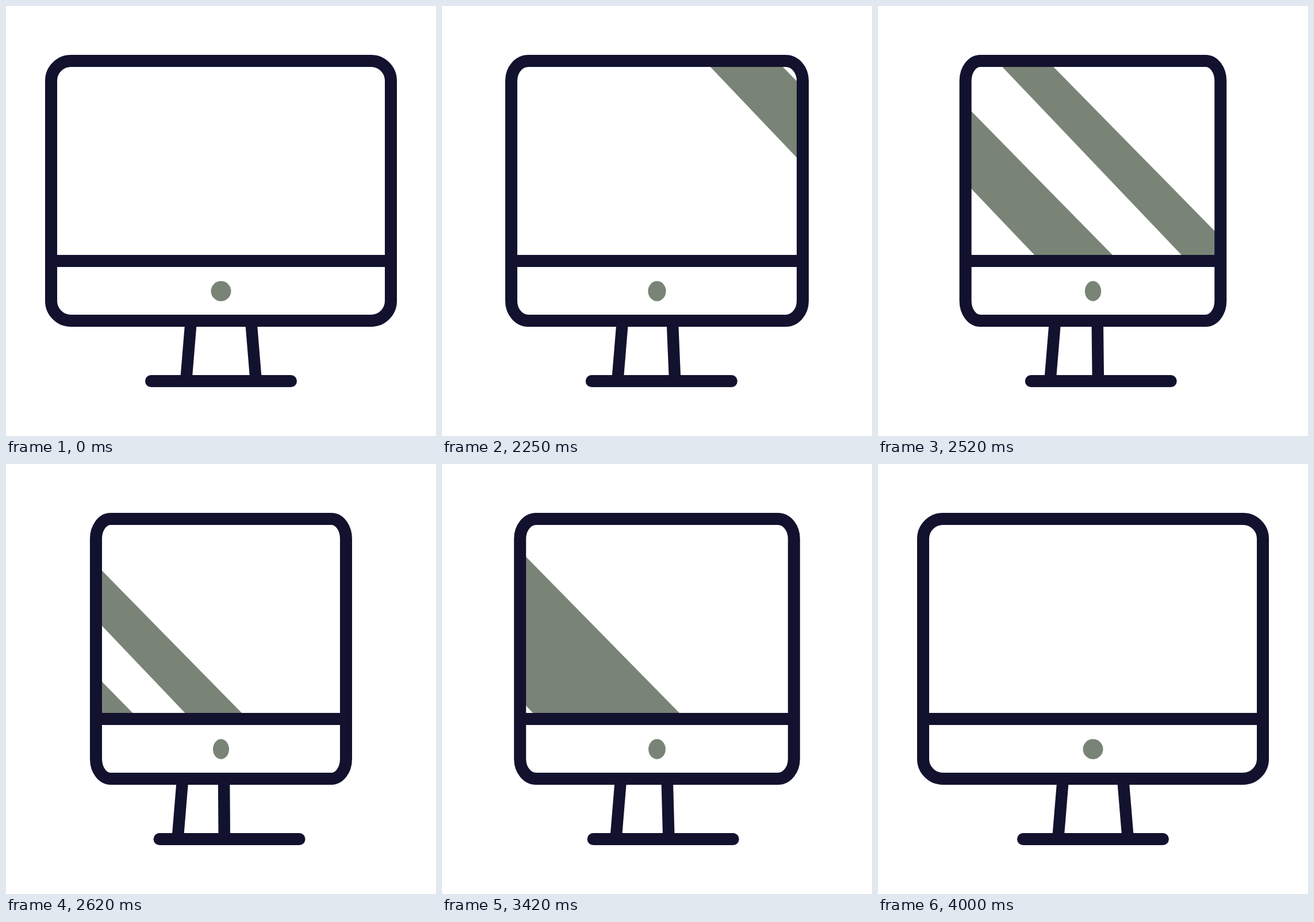
These frames come from a looping animation (748 by 748 pixels, 4.02 s). An HTML page:

```html
<!DOCTYPE html>
<html lang="en">
<head>
<meta charset="utf-8">
<title>Monitor</title>
<style>
  html, body { margin: 0; width: 100%; height: 100%; overflow: hidden; background: #fff; }
  svg { display: block; width: 100%; height: 100%; }
  .ink { fill: none; stroke: #12122f; stroke-width: 21; }
  .tint { fill: #798477; }
</style>
</head>
<body>
<svg viewBox="0 0 748 748">
  <clipPath id="screen"><rect class="case" y="95.5" height="452" ry="34.5"/></clipPath>
  <g class="tint" clip-path="url(#screen)">
    <polygon id="wide"/>
    <polygon id="thin"/>
    <polygon id="back"/>
  </g>
  <ellipse id="button" class="tint" cx="374" cy="496" ry="17.5"/>
  <g class="ink">
    <path id="legs" stroke-width="20.5"/>
    <path id="base" stroke-linecap="round"/>
    <path id="divider"/>
    <rect class="case" y="95.5" height="452" ry="34.5"/>
  </g>
</svg>
<script>
const LOOP = 4020, HALF = 295.5, TURN = 83.5;
const $ = id => document.getElementById(id);
const cases = document.querySelectorAll('.case');

// Bezier easing with control points (a, 0) and (b, 1)
function ease(x, a, b) {
  if (x <= 0) return 0;
  if (x >= 1) return 1;
  let lo = 0, hi = 1, u;
  for (let i = 0; i < 24; i++) {
    u = (lo + hi) / 2;
    const v = 1 - u;
    if (3 * a * u * v * v + 3 * b * u * u * v + u ** 3 < x) lo = u; else hi = u;
  }
  return u * u * (3 - 2 * u);
}

// Diagonal band whose edges cross the top of the screen at left and right
function band(id, left, right) {
  const at = (x, y, slope) => `${x + (y - 106) / slope},${y}`;
  $(id).setAttribute('points', [
    at(left, 95, 1.05), at(right, 95, 1.018),
    at(right, 443, 1.018), at(left, 443, 1.05)
  ].join(' '));
}

function draw(t) {
  const turn = t < 3000
    ? ease((t - 2000) / 1000, 1 / 3, 0)
    : 1 - ease((t - 3000) / 1000, 0.6, 0.4);
  const d = turn * TURN, half = HALF - d, shift = 0.187 * d;

  for (const c of cases) {
    c.setAttribute('x', 374 - half);
    c.setAttribute('width', half * 2);
    c.setAttribute('rx', 34.5 * half / HALF);
  }
  $('divider').setAttribute('d', `M${374 - half} 443.5H${374 + half}`);
  $('button').setAttribute('rx', 17.5 - 0.045 * d);
  $('base').setAttribute('d', `M${252.5 + shift} 652.5H${495.5 + shift}`);
  $('legs').setAttribute('d',
    `M${321.8 - shift} 548L${313.2 - shift} 652` +
    `M${426.2 - 0.604 * d} 548L${434.8 - 0.705 * d} 652`);

  const out = t - 2420, back = t - 3420;
  const wide = 150 - 1.875 * out, thin = 435 - 2.165 * out;
  band('wide', wide, wide + 126);
  band('thin', thin, thin + 89);
  band('back', -155 + 1.733 * back, 90 + 1.683 * back);
  $('wide').style.display = $('thin').style.display = t > 2000 && t < 3000 ? '' : 'none';
  $('back').style.display = t > 3000 && t < 4000 ? '' : 'none';
}

const start = performance.now();
function tick() {
  draw((performance.now() - start) % LOOP);
  requestAnimationFrame(tick);
}
tick();
</script>
</body>
</html>
```
